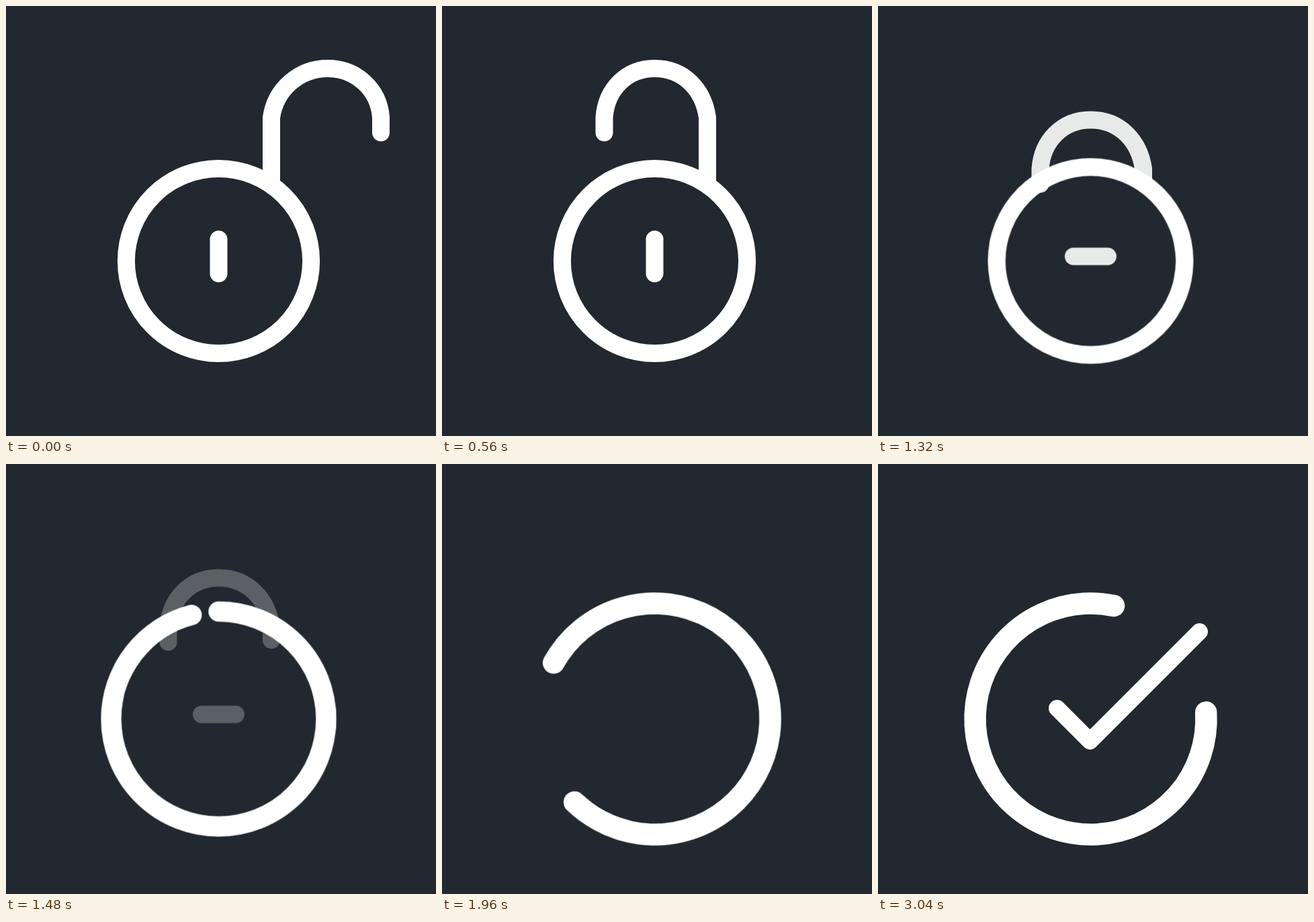
Animation, 640 px wide and 640 px high, one loop 3.08 s. Source, as an HTML page:

```html
<!DOCTYPE html>
<html lang="en">
<head>
<meta charset="utf-8">
<title>Lock to check</title>
<style>
  html, body { margin: 0; width: 100%; height: 100%; overflow: hidden; background: #21282f; }
  svg { display: block; width: 100%; height: 100%; }
  path, circle { fill: none; stroke: #fff; stroke-width: 26; stroke-linecap: round; stroke-linejoin: round; }
  #check { stroke-width: 25; }
</style>
</head>
<body>
<svg viewBox="0 0 640 640">
  <g id="lock">
    <path id="shackle"/>
    <path id="keyhole" d="M316.5 347.2V398.2"/>
  </g>
  <circle id="ring" cx="316.5" cy="379.5" r="137.6" pathLength="360"/>
  <path id="check" d="M266.5 363.5L315.5 412.5L478.5 249.5" pathLength="100"/>
</svg>
<script>
const LOOP = 3080, STEP = 40;
const [lock, shackle, keyhole, ring, check] =
  ['lock', 'shackle', 'keyhole', 'ring', 'check'].map(id => document.getElementById(id));

// Start and end of each move, in ms
const moves = {
  flip: [0, 560],
  close: [600, 1160],
  fade: [1190, 1670],
  grow: [1210, 1690],
  open: [1360, 1700],
  spin: [1560, 2260],
  tick: [2000, 2434]
};

const mix = (a, b, k) => a + (b - a) * k;

// cubic-bezier(.6, 0, .4, 1)
function ease(x) {
  if (x <= 0) return 0;
  if (x >= 1) return 1;
  let lo = 0, hi = 1, s;
  for (let i = 0; i < 24; i++) {
    s = (lo + hi) / 2;
    const v = 1 - s;
    if (1.8 * s * v * v + 1.2 * s * s * v + s * s * s < x) lo = s; else hi = s;
  }
  return s * s * (3 - 2 * s);
}

// The stem stays at x = 395 while the arm swings across it
function shacklePath(flip, drop) {
  const stem = 395;
  const side = mix(1, -1, flip);
  const arm = stem + mix(163, -153.5, flip);
  const top = stem + mix(84, -78.5, flip);
  const y = 93 + drop, low = y + 73;
  return `M${stem} 262V${low}` +
    `C${stem + 6 * side} ${y + 31} ${top - 43 * side} ${y} ${top} ${y}` +
    `C${top + 42 * side} ${y} ${arm - 3 * side} ${y + 31} ${arm} ${low}` +
    `V${y + 95.5}`;
}

function draw(t) {
  const k = {};
  for (const name in moves) {
    const [from, to] = moves[name];
    k[name] = ease((t - from) / (to - from));
  }
  shackle.setAttribute('d', shacklePath(k.flip, 76.5 * k.close));
  keyhole.setAttribute('transform', `rotate(${90 * k.close} 316.5 372.7)`);
  lock.setAttribute('opacity', 1 - k.fade);

  const arc = mix(360, 284.9, k.open);
  ring.setAttribute('stroke-dasharray', k.open ? `${arc} ${360 - arc}` : 'none');
  ring.setAttribute('transform',
    `translate(316.5 379.5) rotate(${446.7 * k.spin - 90}) scale(${mix(1, 1.25, k.grow)}) translate(-316.5 -379.5)`);

  check.setAttribute('visibility', k.tick ? 'visible' : 'hidden');
  check.setAttribute('stroke-dasharray', k.tick < 1 ? `${100 * k.tick} 200` : 'none');
}

const start = performance.now();
function frame() {
  const t = (performance.now() - start) % LOOP;
  draw(Math.floor(t / STEP) * STEP);
  requestAnimationFrame(frame);
}
frame();
</script>
</body>
</html>
```
